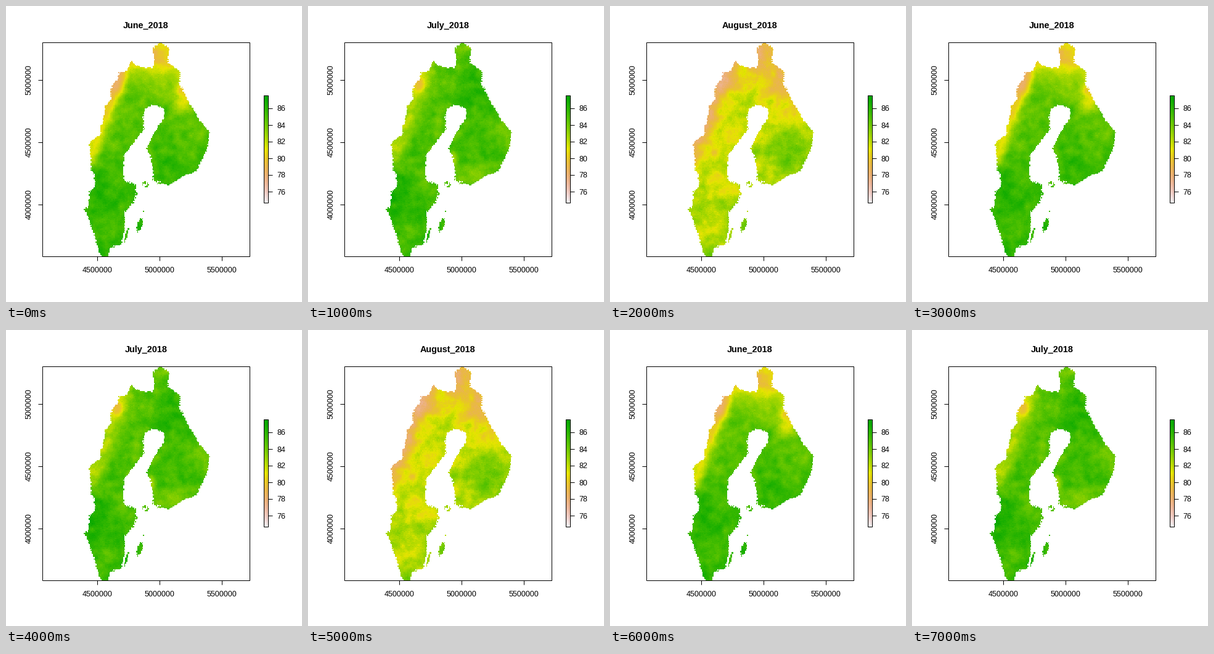
Write a matplotlib script that moves like this. It is 480 px wide and 480 px high and loops after 8000 ms.

```python
import numpy as np
import matplotlib.pyplot as plt
from matplotlib.animation import FuncAnimation
from matplotlib.colors import ListedColormap, hsv_to_rgb
from matplotlib.patches import Rectangle
from matplotlib.path import Path

SIZE = 480
LEFT, RIGHT, TOP, BOTTOM = 59, 395, 59, 406
COLS, ROWS = 210, 217
LOW, HIGH = 74.6, 87.55

plt.rcParams["font.family"] = "Liberation Sans"

# Key points of the outline in stage pixels, clockwise from the northern tip.
east = [(249, 58), (265, 69), (262, 91), (283, 106), (281, 125), (297, 156),
        (313, 183), (331, 205), (325, 235), (309, 267), (287, 276), (264, 291),
        (238, 283)]
gulf = [(239, 271), (235, 245), (228, 231), (242, 202), (257, 180), (256, 165),
        (238, 160), (227, 166), (222, 180), (224, 199), (192, 241), (190, 270),
        (192, 283), (210, 290), (213, 304), (204, 322), (192, 335), (193, 358),
        (187, 387)]
west = [(169, 391), (166, 408), (154, 408), (145, 377), (132, 340), (127, 330),
        (134, 323), (135, 303), (144, 292), (143, 273), (138, 267), (138, 249),
        (135, 222), (147, 211), (154, 210), (154, 195), (160, 176), (160, 163),
        (170, 151), (171, 130), (182, 118), (183, 108), (196, 105), (203, 89),
        (213, 98), (238, 100), (241, 88), (238, 70)]


def centres(start, end, n):
    return start + (np.arange(n) + 0.5) * (end - start) / n


gx, gy = np.meshgrid(centres(LEFT, RIGHT, COLS), centres(TOP, BOTTOM, ROWS))


def terrain(n=255):
    """Grey-white through tan and yellow to green."""
    t = np.linspace(0, 1, n)
    stops = [0, 0.5, 1]
    hue = np.interp(t, stops, [0, 1 / 6, 1 / 3])
    sat = np.interp(t, stops, [0, 1, 1])
    val = np.interp(t, stops, [0.95, 0.9, 0.65])
    return ListedColormap(hsv_to_rgb(np.stack([hue, sat, val], axis=1)))


def radius2(x, y, rx, ry, lean=0):
    """Squared distance from a centre, in units of the two radii."""
    return ((gx - x - lean * (gy - y)) / rx) ** 2 + ((gy - y) / ry) ** 2


def smooth_noise(rng, radius):
    """Blurred unit-variance noise on the grid."""
    span = np.arange(-3 * radius, 3 * radius + 1)
    kernel = np.exp(-0.5 * (span / radius) ** 2)
    field = rng.standard_normal(gx.shape)
    for axis in (0, 1):
        field = np.apply_along_axis(np.convolve, axis, field, kernel, "same")
    return field / field.std()


def land_mask():
    """Mainland with a frayed coast, plus islands and skerries."""
    rng = np.random.default_rng(7)
    fray = 1.1 + 3 * np.exp(-radius2(236, 285, 14, 10))
    fray += 1.2 * np.exp(-radius2(208, 308, 12, 22))
    px, py = (g + fray * rng.uniform(-1, 1, gx.shape) for g in (gx, gy))
    points = np.column_stack([px.ravel(), py.ravel()])
    mask = Path(east + gulf + west).contains_points(points).reshape(gx.shape)
    edge = rng.uniform(0.6, 1.2, gx.shape)
    mask |= radius2(216.5, 355.5, 4.5, 12, lean=-0.27) < edge
    mask |= radius2(195.5, 371, 1.6, 14, lean=-0.27) < edge
    mask |= (radius2(226, 290, 6, 5) < 1) & (rng.random(gx.shape) < 0.5)
    return mask | (radius2(222.5, 333, 1, 1) < 0.7)


def surface(seed, north, south, ridge, width, rough, bumps):
    """North-south trend, western mountain ridge, local bumps and texture."""
    value = np.interp(gy, [100, 320], [north, south])
    border = 138 + 0.36 * (240 - gy)
    fade = 1 / (1 + np.exp((gy - 255) / 6))
    value += ridge * fade * np.exp(-((np.maximum(gx - border, 0) / width) ** 2))
    for x, y, rx, ry, height in bumps:
        value += height * np.exp(-radius2(x, y, rx, ry))
    rng = np.random.default_rng(seed)
    texture = (0.7 * smooth_noise(rng, 4) + 0.6 * smooth_noise(rng, 2)
               + 0.35 * rng.standard_normal(gx.shape))
    return np.clip(value + rough * texture, LOW, HIGH)


june = surface(1, 84, 85.6, -4.3, 14, 0.42, [
    (245, 80, 50, 32, -4.4), (180, 125, 14, 20, -2.3), (290, 140, 18, 32, -3.4),
    (150, 300, 25, 28, 0.9), (160, 360, 25, 20, -0.9), (265, 262, 25, 18, 0.7)])
july = surface(2, 84.7, 85.4, -2.6, 18, 0.45, [
    (180, 125, 12, 14, -3), (272, 135, 28, 35, 1.4), (250, 68, 15, 12, -0.8),
    (145, 312, 18, 20, 1.5), (237, 247, 7, 15, -2.6), (270, 272, 35, 14, -1.6),
    (325, 225, 12, 25, -0.9), (214, 185, 8, 14, -1.2)])
august = surface(3, 80.2, 82.5, -2.6, 14, 0.52, [
    (255, 80, 30, 25, -1.2), (280, 130, 18, 35, -1.2), (215, 165, 22, 25, 1.3),
    (180, 128, 12, 18, -0.8), (292, 230, 38, 36, 2.8), (157, 362, 18, 14, -1.8),
    (188, 298, 14, 10, -1.2), (160, 402, 15, 14, 2), (216, 355, 10, 12, 1.2)])

sea = ~land_mask()
months = [("June_2018", june), ("July_2018", july), ("August_2018", august)]

fig = plt.figure(figsize=(SIZE / 72, SIZE / 72), dpi=72, facecolor="white")
ax = fig.add_axes([0, 0, 1, 1])
scale = dict(cmap=terrain(), vmin=LOW, vmax=HIGH, interpolation="nearest")


def line(x0, y0, x1, y1):
    ax.plot([x0, x1], [y0, y1], color="black", lw=1, solid_capstyle="butt")


def box(x0, y0, x1, y1):
    ax.add_patch(Rectangle((x0, y0), x1 - x0, y1 - y0, fill=False,
                           ec="black", lw=1, zorder=3))


def label(x, y, text, **kw):
    style = dict(fontsize=12.5, ha="center", va="baseline") | kw
    return ax.text(x, y, text, **style)


raster = ax.imshow(np.ma.array(june, mask=sea),
                   extent=(LEFT, RIGHT, BOTTOM, TOP), **scale)
ax.imshow(np.linspace(HIGH, LOW, 255)[:, None],
          extent=(418, 425, 319, 145), **scale)
box(LEFT, TOP, RIGHT, BOTTOM)
box(418, 145, 425, 319)

for i in range(3):
    step = 100.8 * i
    x, y = round(148 + step), round(322 - step)
    line(x, BOTTOM, x, BOTTOM + 7)
    label(x, 432.5, str(4500000 + 500000 * i))
    line(LEFT - 7, y, LEFT, y)
    label(38, y, str(4000000 + 500000 * i), rotation=90, va="center")

for value in range(76, 88, 2):
    y = round(301 - 13.5 * (value - 76))
    line(425, y, 432, y)
    label(439, y + 4.5, str(value), ha="left")

title = label(227, 36, "", fontsize=14.4, weight="bold")
ax.set(xlim=(0, SIZE), ylim=(SIZE, 0), aspect="auto")
ax.axis("off")


def draw(i):
    name, values = months[i % len(months)]
    title.set_text(name)
    raster.set_data(np.ma.array(values, mask=sea))
    return title, raster


anim = FuncAnimation(fig, draw, frames=8, interval=1000, repeat=True)
plt.show()
```
